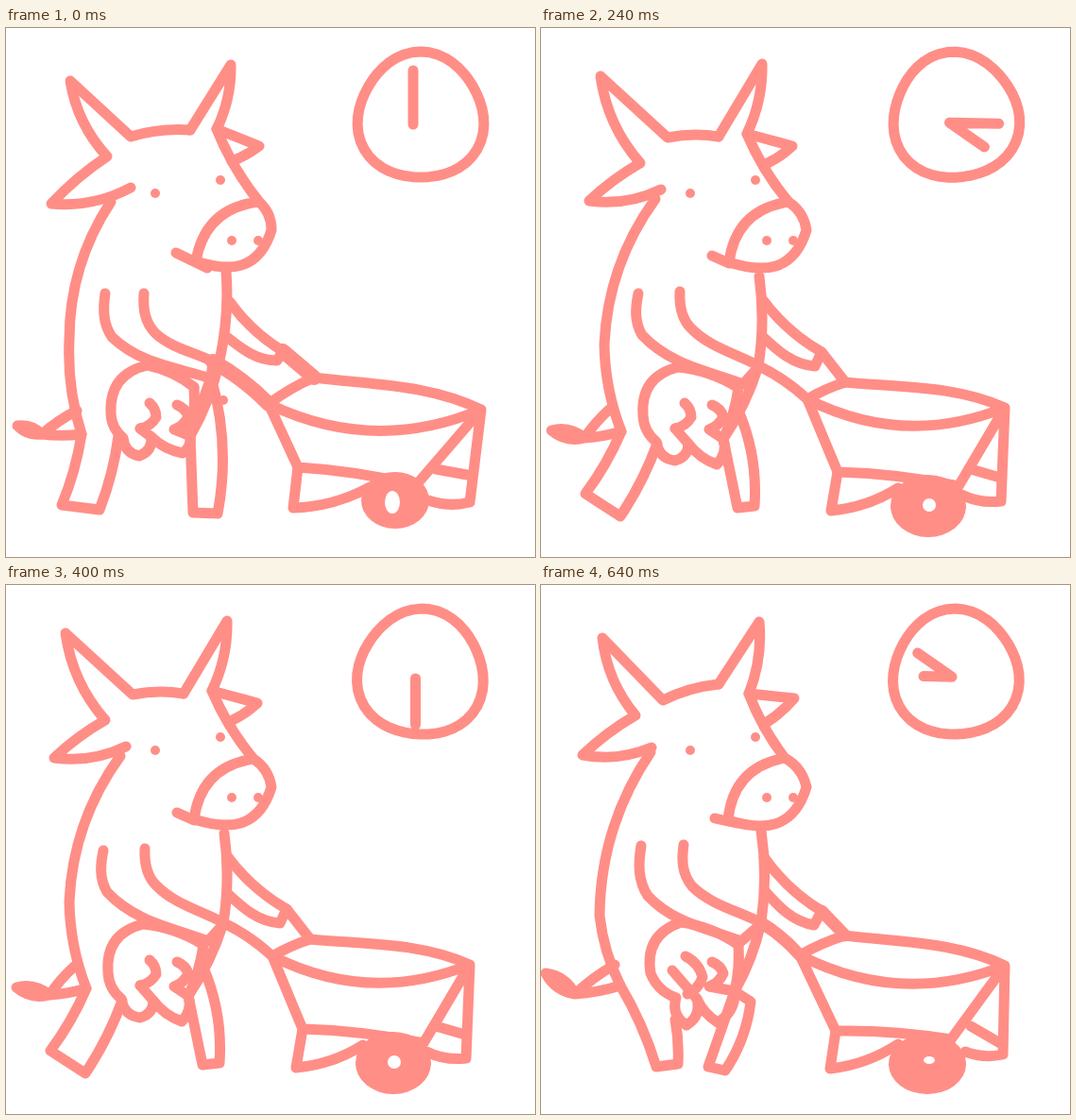
An HTML page for the animation above (720 ms loop, 560x560 px).

```html
<!DOCTYPE html>
<html lang="en">
<head>
<meta charset="utf-8">
<title>Cow with a wheelbarrow</title>
<style>
html, body { margin: 0; width: 100%; height: 100%; overflow: hidden; background: #fff; }
svg { display: block; width: 100%; height: 100%; }
path { fill: none; stroke: #ff8e87; stroke-width: 11; stroke-linecap: round; stroke-linejoin: round; }
ellipse { fill: #ff8e87; }
.hole { fill: #fff; }
.pose, .clock { visibility: hidden; animation: third 720ms step-end infinite; }
.clock { animation-name: ninth; }
@keyframes third { 0% { visibility: visible; } 33.3333%, 100% { visibility: hidden; } }
@keyframes ninth { 0% { visibility: visible; } 11.1111%, 100% { visibility: hidden; } }
</style>
</head>
<body>
<svg id="stage" viewBox="0 0 560 560"></svg>
<script>
// Joints that all poses share unless they override them.
const shared = {
  eyeL: [158, 175], eyeR: [227, 161], nostrilL: [239, 225], nostrilR: [267, 225],
  snoutR: [281, 214], foldTop1: [152, 397], fold1: [159, 412], foldEnd1: [142, 424],
  foldTop2: [181, 399], fold2: [193, 411], foldEnd2: [178, 425], crease: [142, 424],
  brace: [455, 467], dots: ["eyeL", "eyeR", "nostrilL", "nostrilR"]
};

const poses = [
  {
    crownL: [132, 115], hornL: [68, 56], earRoot: [107, 136], earL: [48, 186], cheek: [132, 169],
    crownR: [195, 108], hornR: [238, 39], brow: [223, 107], earR: [268, 125], earEnd: [239, 141],
    snoutTop: [268, 184], snoutL: [201, 247], mouthL: [180, 238], mouthR: [213, 254],
    nape: [111, 184], back: [67, 330], rump: [80, 430], heel: [59, 505], toe: [99, 510], knee: [119, 432],
    chest: [233, 258], belly: [226, 352], groin: [195, 432], heel2: [198, 513], toe2: [224, 514], hip: [217, 370],
    tailTop: [75, 405], tailMid: [38, 430], tailTip: [12, 421],
    shoulder: [105, 281], elbow: [112, 327], wrist: [217, 371],
    inner: [146, 281], innerElbow: [158, 323], hand: [219, 353],
    farTop: [237, 290], cuffTop: [293, 342], cuffLow: [287, 352], farLow: [235, 328],
    udderTop: [150, 357], udderL: [111, 408], udderBase: [124, 434], udderR: [199, 380],
    teat1: [141, 453], cleft: [154, 433], teat2: [187, 450],
    corner: [278, 398], handle: [326, 370], rim: [503, 404], baseL: [309, 465], baseR: [434, 484],
    post: [491, 502], postEnd: [447, 500], braceEnd: [488, 473], stand: [304, 508], standEnd: [385, 486],
    spot: [230, 394], dots: [...shared.dots, "spot"],
    wheel: [412, 500, 36, 30], hole: [409, 502, 8, 12], grip: 16
  },
  {
    crownL: [134, 116], hornL: [63, 51], earRoot: [105, 143], earL: [51, 183], cheek: [127, 171],
    crownR: [188, 115], hornR: [234, 38], brow: [218, 112], earR: [266, 125], earEnd: [240, 143],
    snoutTop: [262, 184], snoutL: [199, 248], mouthL: [181, 241], mouthR: [199, 249],
    nape: [121, 181], back: [67, 335], rump: [85, 427], heel: [47, 493], toe: [84, 517], knee: [123, 440],
    chest: [231, 263], belly: [230, 358], groin: [193, 435], heel2: [208, 508], toe2: [226, 506], hip: [209, 405],
    tailTop: [72, 404], tailMid: [46, 434], tailTip: [11, 426],
    shoulder: [103, 281], elbow: [107, 325], wrist: [214, 377],
    inner: [147, 279], innerElbow: [159, 318], hand: [231, 358],
    farTop: [235, 288], cuffTop: [297, 343], cuffLow: [290, 358], farLow: [235, 327],
    udderTop: [145, 359], udderL: [108, 410], udderBase: [122, 438], udderR: [209, 381],
    teat1: [142, 458], cleft: [156, 440], teat2: [186, 462],
    corner: [282, 393], handle: [322, 375], rim: [491, 402], baseL: [314, 470], baseR: [442, 485],
    post: [487, 501], postEnd: [445, 494], braceEnd: [486, 476], stand: [307, 511], standEnd: [378, 487],
    wheel: [410, 506, 40, 33], hole: [411, 505, 7, 7], grip: 11
  },
  {
    crownL: [129, 122], hornL: [65, 56], earRoot: [100, 138], earL: [44, 180], cheek: [117, 172],
    crownR: [188, 105], hornR: [231, 39], brow: [220, 115], earR: [268, 120], earEnd: [238, 146],
    snoutTop: [258, 183], snoutL: [198, 249], mouthL: [184, 247], mouthR: [207, 252],
    nape: [116, 177], back: [62, 350], rump: [84, 424], heel: [122, 510], toe: [145, 507], knee: [142, 460],
    chest: [233, 260], belly: [233, 357], groin: [205, 430], heel2: [177, 510], toe2: [195, 514], hip: [222, 441],
    tailTop: [78, 402], tailMid: [36, 433], tailTip: [5, 411],
    shoulder: [106, 276], elbow: [113, 329], wrist: [212, 377],
    inner: [151, 275], innerElbow: [160, 319], hand: [234, 358],
    farTop: [236, 288], cuffTop: [297, 345], cuffLow: [289, 360], farLow: [237, 324],
    udderTop: [148, 357], udderL: [116, 411], udderBase: [143, 437], udderR: [209, 381],
    teat1: [154, 466], cleft: [165, 438], teat2: [187, 463],
    foldTop1: [153, 393], fold1: [171, 415], foldEnd1: [155, 433], crease: [139, 408],
    corner: [274, 392], handle: [322, 371], rim: [491, 403], baseL: [312, 472], baseR: [434, 481],
    post: [489, 497], postEnd: [449, 494], braceEnd: [486, 485], stand: [306, 512], standEnd: [378, 486],
    wheel: [409, 507, 41, 32], hole: [411, 503, 6, 4], grip: 13
  }
];

// Each stroke joins joints; ":a,b" bows the line towards its right-hand side.
const strokes = [
  "crownR crownL:.06 hornL earRoot:.1 earL:.04 cheek:.1",
  "crownR hornR brow:-.08 earR earEnd:-.05",
  "brow snoutTop:.05 snoutL:.25 snoutR:.28,.4 snoutTop:.15",
  "mouthL mouthR",
  "nape back:.1 rump:.06 heel:-.04 toe knee:.04",
  "chest belly:-.05 groin:-.05 heel2 toe2 hip:.08 groin",
  "tailTop tailMid:.04 tailTip:.17 tailMid:.17 rump:.04",
  "shoulder elbow:.1,.16 wrist:.13,.03 hand",
  "inner innerElbow:.12,.18 hand:.1,0",
  "farTop cuffTop:.07 cuffLow farLow:-.16,-.08",
  "udderR udderTop:.08 udderL:.28 udderBase:.15 teat1:.25 cleft:.25 teat2:.1 groin:.2",
  "udderR groin:-.05",
  "foldTop1 fold1:-.15 foldEnd1:-.15",
  "crease cleft",
  "foldTop2 fold2:-.15 foldEnd2:-.15 groin",
  "corner handle:-.04 rim:-.02,-.09 corner:-.15 baseL baseR:-.03 rim post postEnd:-.1",
  "brace braceEnd",
  "baseL stand standEnd:.08"
];
const grips = ["hand corner:-.05", "cuffTop handle"];

function bow([x1, y1], [x2, y2], b1, b2) {
  const dx = x2 - x1, dy = y2 - y1;
  const at = (u, b) => [x1 + dx * u - dy * b, y1 + dy * u + dx * b];
  return `C${at(1 / 3, b1)} ${at(2 / 3, b2)} ${[x2, y2]}`;
}

function trace(joints, stroke) {
  let last;
  return stroke.split(" ").map(step => {
    const [name, bend = "0"] = step.split(":");
    const [b1, b2 = b1] = bend.split(",").map(Number);
    const from = last;
    last = joints[name];
    return from ? bow(from, last, b1, b2) : "M" + last;
  }).join("");
}

const path = (d, width = 11) => `<path d="${d}" style="stroke-width:${width}px"/>`;

const oval = ([x, y, rx = 5, ry = 5], cls = "") =>
  `<ellipse class="${cls}" cx="${x}" cy="${y}" rx="${rx}" ry="${ry}"/>`;

const layer = (cls, start, art) =>
  `<g class="${cls}" style="animation-delay:${start - 720}ms">${art}</g>`;

function drawPose(pose) {
  const p = { ...shared, ...pose };
  return strokes.map(s => path(trace(p, s))).join("") +
    grips.map(s => path(trace(p, s), p.grip)).join("") +
    p.dots.map(name => oval(p[name])).join("") +
    oval(p.wheel) + oval(p.hole, "hole");
}

// A wobbly rim; the hands drift apart and meet again at twelve and six.
function drawClock(i) {
  const rim = Array.from({ length: 49 }, (_, k) => {
    const a = k / 48 * 2 * Math.PI - Math.PI / 2;
    const r = 66.5 + 2.5 * Math.sin(3 * a + 0.5 * Math.sin(i * 2.4));
    return [439 + r * Math.cos(a), 94 + r * Math.sin(a)];
  });
  const mean = i * Math.PI / 5, gap = 0.31 * Math.sin(mean);
  const pivot = [431 + i / 2, 102 - 0.6 * i];
  const hand = (a, len) =>
    `M${pivot}L${pivot[0] + len * Math.sin(a)} ${pivot[1] - len * Math.cos(a)}`;
  return path("M" + rim.join("L") + "Z" + hand(mean - gap, 57 - 1.6 * i) + hand(mean + gap, 54 - 3 * i));
}

document.getElementById("stage").innerHTML =
  poses.map((p, i) => layer("pose", i * 240, drawPose(p))).join("") +
  Array.from({ length: 9 }, (_, i) => layer("clock", i * 80, drawClock(i))).join("");
</script>
</body>
</html>
```
